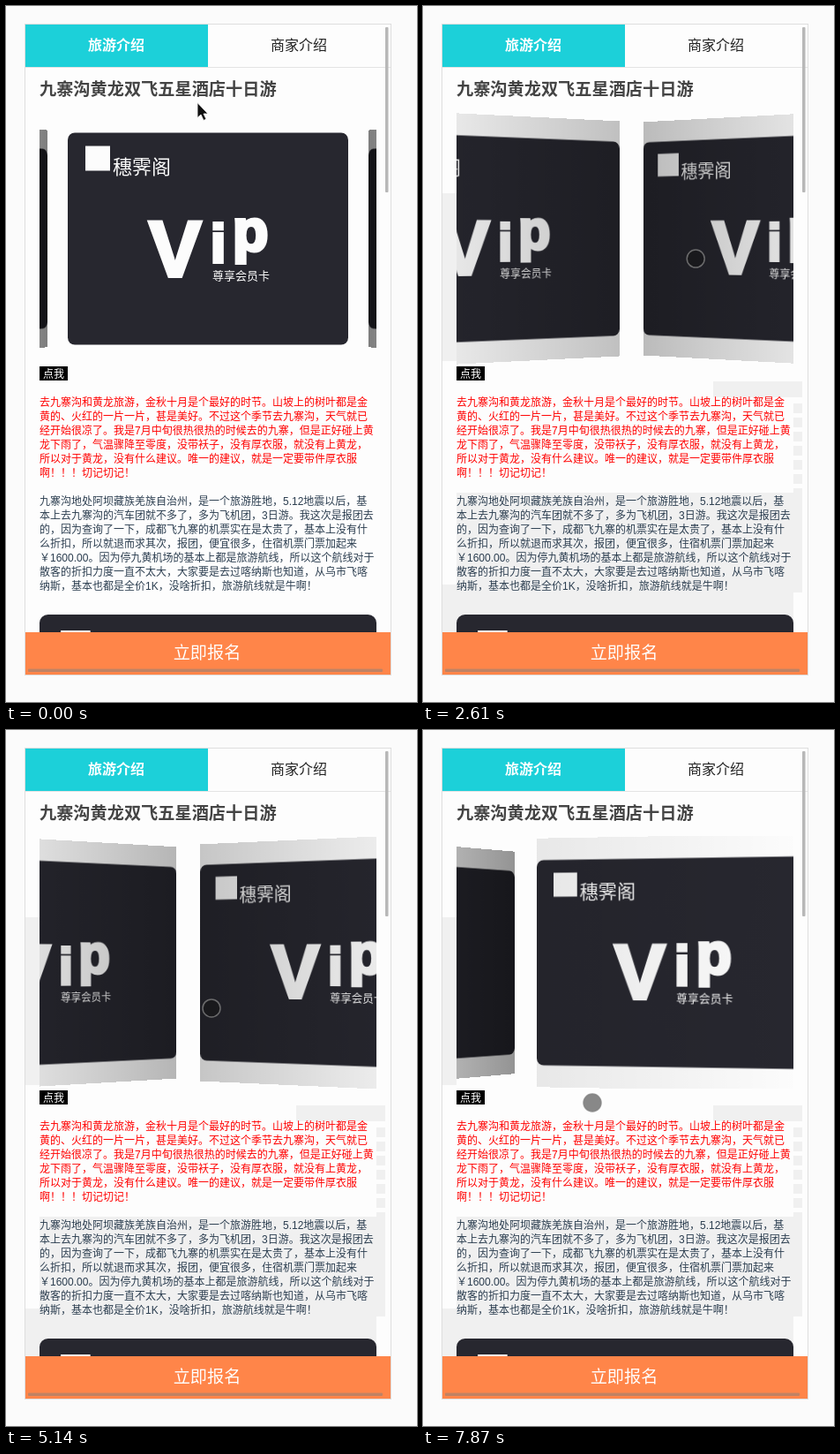
These frames come from a looping animation (466 px wide and 788 px high, 8000 ms). An HTML page:

```html
<!DOCTYPE html>
<html lang="zh">
<head>
<meta charset="utf-8">
<style>
html, body { margin: 0; width: 100%; height: 100%; overflow: hidden; background: #fbfbfb; }
svg { position: absolute; left: 0; top: 0; }
text { font-family: "Liberation Sans", "Noto Sans CJK SC", sans-serif; white-space: pre; }
#copy text { font-family: "Liberation Sans", "Noto Sans CJK TC", "Noto Sans CJK SC", sans-serif; }
#card .vip { font-family: "Noto Sans", "Open Sans", sans-serif; font-weight: 900; stroke: #fcfcfc; stroke-width: 4; }
#swiper { position: absolute; left: 38px; top: 120px; width: 382px; height: 286px; overflow: hidden; background: #fdfdfd; perspective: 1200px; }
.slide { position: absolute; left: 32px; top: -2.5px; width: 318px; height: 291px; background: #fdfdfd; }
.shade { position: absolute; inset: 0; }
</style>
</head>
<body>
<svg width="466" height="788">
  <defs>
    <g id="card" fill="#fcfcfc">
      <rect width="318" height="240" rx="8" fill="#27272f"/>
      <rect x="20" y="15" width="28" height="28"/>
      <text x="51" y="46" font-size="22">穗霁阁</text>
      <g class="vip">
        <text x="92" y="162" font-size="89">V</text>
        <text x="162" y="146" font-size="62">i</text>
        <text x="187" y="133" font-size="66">p</text>
      </g>
      <text x="164" y="166" font-size="13">尊享会员卡</text>
    </g>
    <clipPath id="page"><rect x="22" y="21" width="414" height="688"/></clipPath>
  </defs>
  <rect x="21.5" y="20.5" width="415" height="737" fill="#fdfdfd" stroke="#dedede"/>
  <g id="patches" fill="#f0f0f0">
    <path d="M22 212h16v190h-16zM38 551h392v113h-10v45H22v-54h16z"/>
    <path d="M329 434h101" stroke="#f0f0f0" stroke-width="18"/>
    <path d="M425 450V551" stroke="#f0f0f0" stroke-width="10" stroke-dasharray="11 5"/>
  </g>
  <path d="M22 69.5H436" stroke="#e4e4e4"/>
  <rect x="22" y="21" width="207" height="48" fill="#1cd0d9"/>
  <g font-size="16" text-anchor="middle">
    <text x="125" y="50" fill="#fff" font-weight="bold">旅游介绍</text>
    <text x="332" y="50" fill="#222">商家介绍</text>
  </g>
  <text x="38" y="101" font-size="19.2" font-weight="bold" fill="#444">九寨沟黄龙双飞五星酒店十日游</text>
  <rect x="38" y="408" width="32" height="16"/>
  <text x="42" y="420.5" font-size="12" fill="#fff">点我</text>
  <g id="copy" font-size="12"></g>
  <g clip-path="url(#page)"><use href="#card" transform="translate(38 689) scale(1.2013)"/></g>
  <rect x="22" y="709" width="414" height="48" fill="#ff8549"/>
  <path d="M22 757.5H436" stroke="#dedede"/>
  <text x="228" y="739" font-size="19.2" text-anchor="middle" fill="#fff">立即报名</text>
  <rect x="430" y="24" width="3.5" height="187" rx="1" fill="#b8b8b8"/>
  <rect x="25" y="750.5" width="402" height="3.5" rx="1" fill="#808080" opacity=".5"/>
</svg>
<div id="swiper"></div>
<svg width="466" height="788">
  <path id="arrow" d="M217 109.5v17l4-3.5 3 6.5 3-1.5-3-6h5z" fill="#111" stroke="#fff" stroke-width=".8"/>
  <circle id="touch" r="10" fill="#141414" fill-opacity=".5" stroke="#808080" stroke-opacity=".8" stroke-width="1.5"/>
</svg>
<script>
const $ = id => document.getElementById(id);
const LOOP = 8000, WIDTH = 318, HOLD = 140;

function addCopy(top, color, words) {
  $('copy').innerHTML += words.split('\n').map((line, i) =>
    `<text x="38" y="${top + i * 16}" fill="${color}">${line}</text>`).join('');
}
addCopy(452.5, '#f00', `去九寨沟和黄龙旅游，金秋十月是个最好的时节。山坡上的树叶都是金
黄的、火红的一片一片，甚是美好。不过这个季节去九寨沟，天气就已
经开始很凉了。我是7月中旬很热很热的时候去的九寨，但是正好碰上黄
龙下雨了，气温骤降至零度，没带袄子，没有厚衣服，就没有上黄龙，
所以对于黄龙，没有什么建议。唯一的建议，就是一定要带件厚衣服
啊！！！切记切记！`);
addCopy(564.5, '#2c3e50', `九寨沟地处阿坝藏族羌族自治州，是一个旅游胜地，5.12地震以后，基
本上去九寨沟的汽车团就不多了，多为飞机团，3日游。我这次是报团去
的，因为查询了一下，成都飞九寨的机票实在是太贵了，基本上没有什
么折扣，所以就退而求其次，报团，便宜很多，住宿机票门票加起来
￥1600.00。因为停九黄机场的基本上都是旅游航线，所以这个航线对于
散客的折扣力度一直不太大，大家要是去过喀纳斯也知道，从乌市飞喀
纳斯，基本也都是全价1K，没啥折扣，旅游航线就是牛啊！`);

const slides = [-1, 0, 1].map(place => {
  const el = document.createElement('div');
  el.className = 'slide';
  el.innerHTML = '<svg width="318" height="291"><use href="#card" y="25.5"/></svg><div class="shade"></div>';
  $('swiper').append(el);
  return { el, place, shade: el.lastChild };
});

// Resting poses: time, cards passed, drag past the card, finger
const poses = [
  { at: 0, card: 0, drag: 0, x: 217, y: 135 },
  { at: 1920, card: 1, drag: 66, x: 262, y: 275 },
  { at: 3370, card: 2, drag: 9, x: 323, y: 304 },
  { at: 4300, card: 3, drag: 13.5, x: 207, y: 320 },
  { at: 5830, card: 4, drag: -58, x: 261, y: 310 },
  { at: 6760, card: 3, drag: 65, x: 76, y: 316 },
  { at: 7870, card: 3, drag: 54, x: 192, y: 422 }
];

// Eased move from one pose to the next, the finger swinging on the way
function poseAt(t) {
  const i = poses.findLastIndex(p => p.at <= t);
  const a = poses[i], b = poses[i + 1] || a;
  const u = Math.max(0, (t - a.at - HOLD) / (b.at - a.at - HOLD || LOOP));
  const ease = u * u * (3 - 2 * u);
  const mix = key => a[key] + (b[key] - a[key]) * ease;
  return {
    travel: mix('card') * WIDTH + mix('drag'),
    x: mix('x') + (a === b ? 0 : 50 * Math.sin(2 * Math.PI * u)),
    y: mix('y')
  };
}

function draw(t) {
  const { travel, x: touchX, y: touchY } = poseAt(t);
  const shift = (travel + WIDTH / 2) % WIDTH - WIDTH / 2;
  for (const { el, place, shade } of slides) {
    const x = shift + place * WIDTH, turn = x / WIDTH;
    el.style.transform = `translate3d(${x}px, 0, ${-100 * Math.abs(turn)}px) rotateY(${-50 * turn}deg)`;
    shade.style.background = `linear-gradient(to ${turn < 0 ? 'left' : 'right'}, rgba(0,0,0,.5), rgba(0,0,0,0))`;
    shade.style.opacity = Math.min(1, Math.abs(turn));
  }
  const started = t >= 150;
  $('arrow').style.display = started ? 'none' : '';
  $('touch').style.display = $('patches').style.display = started ? '' : 'none';
  $('touch').setAttribute('cx', touchX);
  $('touch').setAttribute('cy', touchY);
}

const origin = performance.now();
function tick() {
  draw((performance.now() - origin) % LOOP);
  requestAnimationFrame(tick);
}
tick();
</script>
</body>
</html>
```
